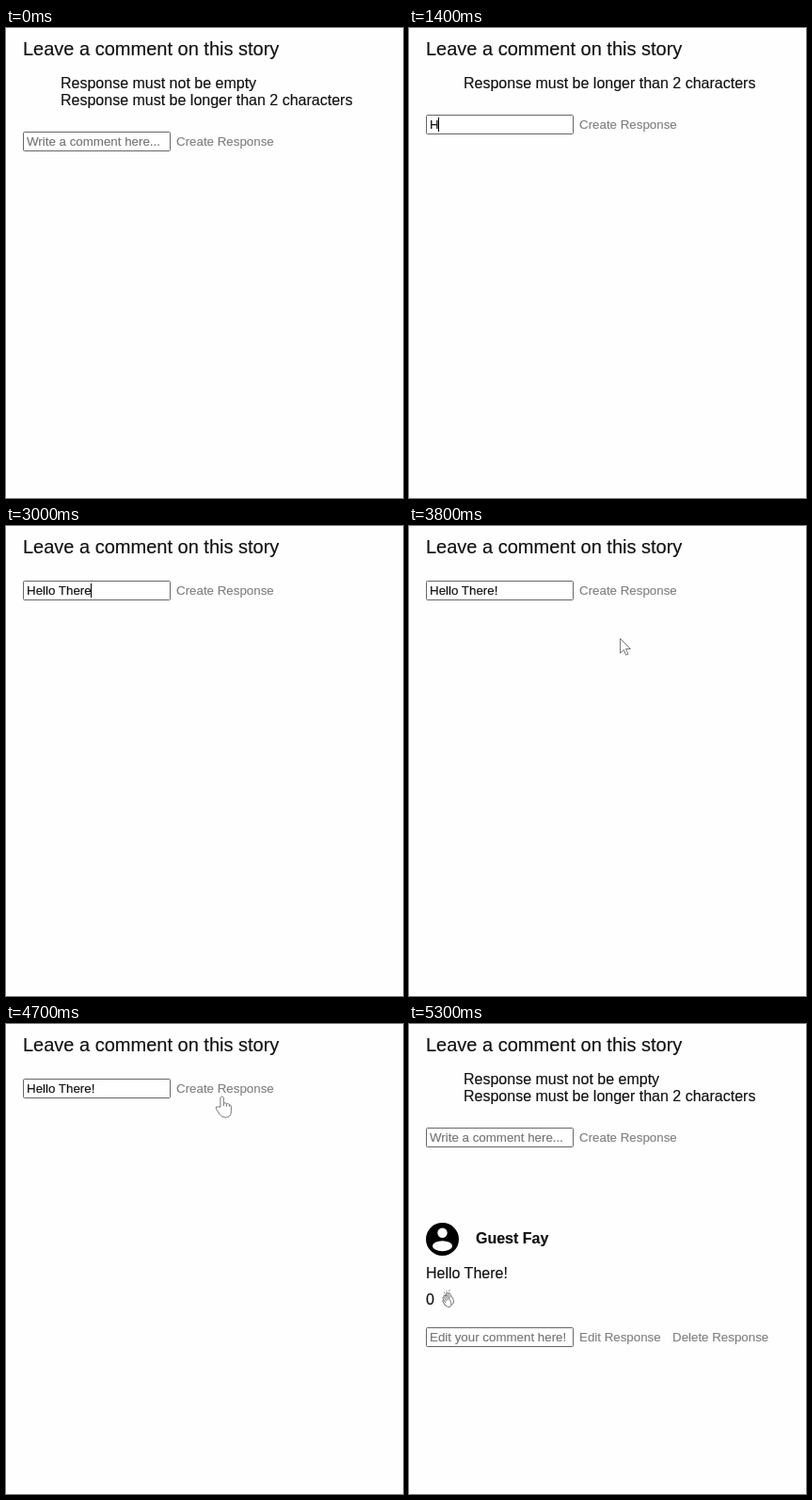
Animation of 422 by 499 pixels, one loop 5700 ms. Source, as an HTML page:

```html
<!DOCTYPE html>
<html lang="en">
<head>
<meta charset="utf-8">
<title>Comment form</title>
<style>
  html, body { margin: 0; width: 100%; height: 100%; overflow: hidden; background: #fefefe; }
  svg { display: block; width: 422px; height: 499px; }
  text { font-family: "Liberation Sans", Arial, sans-serif; font-size: 16px; color: #111;
    fill: currentColor; stroke: currentColor; stroke-width: .15; white-space: pre; }
  .title { font-size: 20px; }
  .small { font-size: 13.333px; }
  .dim { color: #808080; }
  .hint { color: #757575; }
  .box { fill: #fff; stroke: #666; }
  .clap { fill: #fefefe; stroke: #777; stroke-linecap: round; stroke-linejoin: round; }
  .mouse { fill: #fff; stroke: #777; stroke-linejoin: round; }
</style>
</head>
<body>
<svg viewBox="0 0 422 499">
  <defs>
    <path id="palm" d="M-5 3V-2q1-1.500 2 0V-5q1-1.500 2 0V-6q1-1.500 2 0v1q1-1.500 2 0V3q-1 5-4 5t-4-5zM-3-2v3M-1-5v5M1-5v5"/>
  </defs>
  <text class="title" x="18" y="29">Leave a comment on this story</text>
  <text id="empty" x="58" y="64">Response must not be empty</text>
  <text id="short" x="58">Response must be longer than 2 characters</text>

  <g id="form">
    <rect class="box" x="18.5" y=".5" width="156" height="20" rx="1"/>
    <text id="value" class="small" x="22" y="15"></text>
    <rect id="caret" y="3" width="1" height="15"/>
    <text id="create" class="small" x="181" y="15">Create Response</text>
  </g>

  <g id="comment">
    <circle cx="35.5" cy="228.5" r="17.5"/>
    <circle cx="35.5" cy="221.8" r="5.2" fill="#fff"/>
    <ellipse cx="35.5" cy="235.7" rx="10.5" ry="5.500" fill="#fff"/>
    <text x="71" y="233" font-weight="bold">Guest Fay</text>
    <text x="18" y="270">Hello There!</text>
    <text x="18" y="298">0</text>
    <g class="clap" transform="translate(40.500 293.500) rotate(-32) scale(.9)">
      <use href="#palm" x="4" y="-1"/>
      <use href="#palm"/>
      <path d="M2-9v-1M5-9l.5-1M8-8l1-1"/>
    </g>
    <rect class="box" x="18.5" y="322.5" width="156" height="20" rx="1"/>
    <text class="small hint" x="22" y="337">Edit your comment here!</text>
    <text class="small dim" x="181" y="337">Edit Response</text>
    <text class="small dim" x="280" y="337">Delete Response</text>
  </g>

  <path id="arrow" class="mouse" d="M.5 .5V16l4-3.500 2 5.500 2.500-1-2.500-5.500h5z"/>
  <path id="hand" class="mouse" d="M-2 12V2q1.800-3 3.500 0v6q2-1.500 3 .5 2-1 3 1 2 0 2 2V16q0 7-6 7-4 0-6-3l-4-6q-1-3 2-2.500zM1.500 8v3M4.500 8.500v3M7.500 9.500v2"/>
</svg>
<script>
  const LOOP = 5700, STEP = 100, ENTER = 3800, SENT = 4800;
  const $ = id => document.getElementById(id);

  // Bursts of typing with a steady gap between keys
  const bursts = [
    { start: 1400, gap: 133, keys: "Hello " },
    { start: 2600, gap: 100, keys: "Th" },
    { start: 2850, gap: 50, keys: "ere" },
    { start: 3300, gap: 50, keys: "!" }
  ];
  // Rests of the pointer; every leg eases in
  const stops = [
    { t: ENTER, x: 224, y: 119 },
    { t: 4000, x: 222, y: 78 },
    { t: 4200, x: 228.5, y: 71 },
    { t: 4400, x: 228.5, y: 71 },
    { t: 5000, x: 234, y: 92 },
    { t: 5200, x: 336, y: 446 }
  ];

  const within = (t, a, b) => t >= a && t < b;
  const show = (id, on) => $(id).setAttribute("display", on ? "inline" : "none");
  const move = (id, x, y) => $(id).setAttribute("transform", `translate(${x} ${y})`);

  const typedAt = t => t >= SENT ? "" : bursts.map(({ start, gap, keys }) =>
    keys.slice(0, Math.max(0, Math.floor((t - start) / gap) + 1))).join("");

  function pointerAt(t) {
    const i = stops.findIndex(s => s.t > t);
    if (i < 1) return null;
    const a = stops[i - 1], b = stops[i];
    const k = ((t - a.t) / (b.t - a.t)) ** 2;
    return [a.x + (b.x - a.x) * k, a.y + (b.y - a.y) * k];
  }

  function draw(t) {
    const typed = typedAt(t);
    const none = !typed, tooShort = typed.length < 3;
    show("empty", none);
    show("short", tooShort);
    $("short").setAttribute("y", none ? 82 : 64);
    move("form", 0, none ? 110 : tooShort ? 92 : 58);

    const value = $("value");
    value.textContent = typed || "Write a comment here...";
    value.setAttribute("class", none ? "small hint" : "small");
    $("caret").setAttribute("x", Math.round(21.7 + (none ? 0 : value.getComputedTextLength())));
    show("caret", within(t, 400, 700) || within(t, 1200, ENTER) || within(t, 4300, 4600));
    $("create").setAttribute("class", within(t, 4200, 4700) ? "small" : "small dim");
    show("comment", t >= SENT);

    const tip = pointerAt(t), isHand = within(t, 4200, SENT);
    show("hand", tip && isHand);
    show("arrow", tip && !isHand);
    if (tip) move(isHand ? "hand" : "arrow", ...tip);
  }

  const start = performance.now();
  function tick() {
    const t = (performance.now() - start) % LOOP;
    draw(Math.floor(t / STEP) * STEP);
    requestAnimationFrame(tick);
  }
  tick();
</script>
</body>
</html>
```
